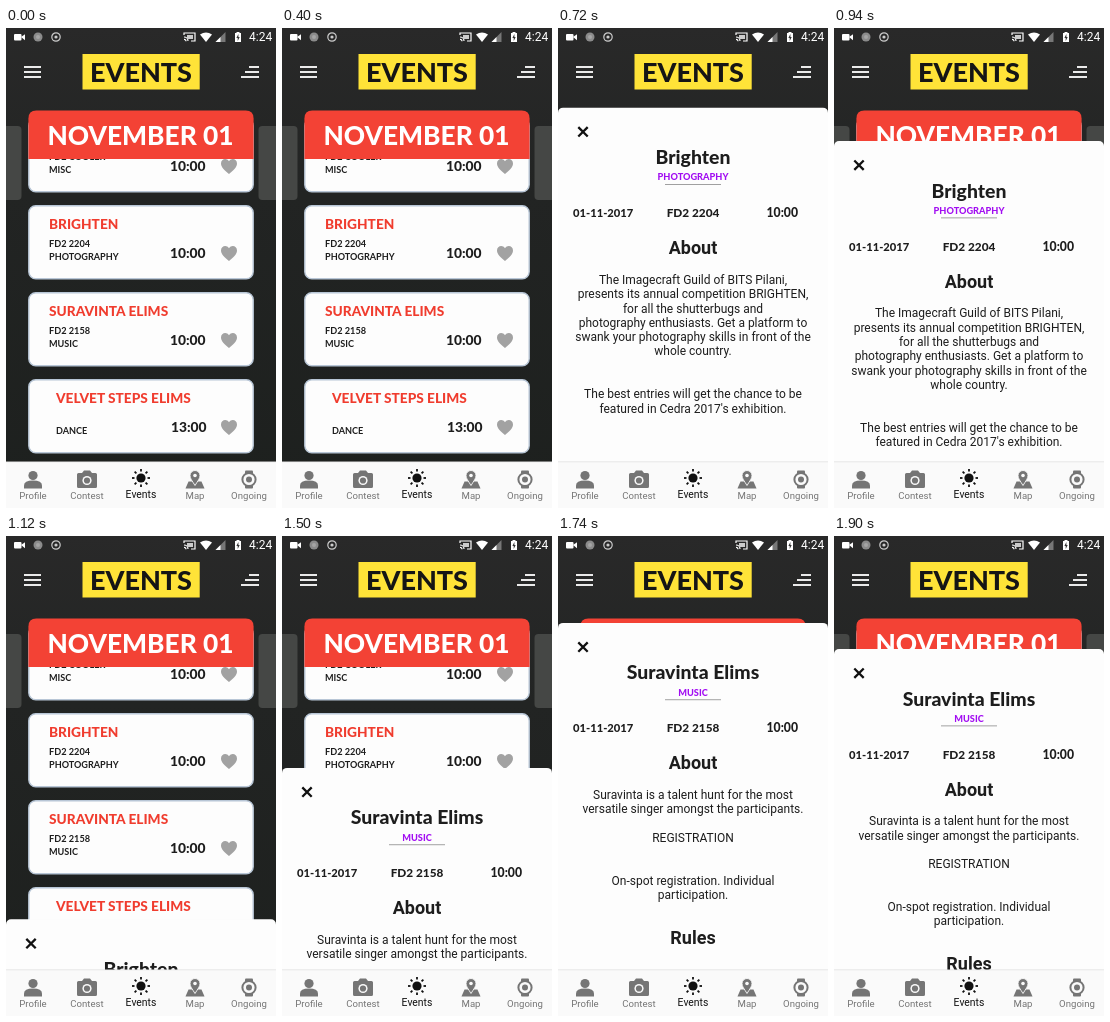
Write an HTML page that moves like this. It is 270 px wide and 480 px high and loops after 1.92 s.

```html
<!DOCTYPE html>
<html lang="en">
<head>
<meta charset="utf-8">
<title>Events</title>
<style>
html, body { margin: 0; width: 100%; height: 100%; overflow: hidden; background: #222; }
svg { display: block; width: 270px; height: 480px; }
text { font-family: Lato, "Open Sans", sans-serif; font-weight: 800; white-space: pre; }
.mid { text-anchor: middle; }
.body { font-family: Roboto, sans-serif; font-weight: 400; }
.head { font-family: Roboto, sans-serif; font-weight: 700; }
.small { font-weight: 700; }
</style>
</head>
<body>
<svg id="stage" viewBox="0 0 270 480"></svg>
<script>
const LOOP = 1920, REST = 113, HIDDEN = 480;

const text = (x, y, size, str, cls = '', fill = '#1d1d1d') =>
  `<text x="${x}" y="${y}" class="${cls}" style="font-size:${size}px;fill:${fill}">${str}</text>`;
const rect = (x, y, w, h, fill, r = 0, extra = '') =>
  `<rect x="${x}" y="${y}" width="${w}" height="${h}" rx="${r}" fill="${fill}" ${extra}/>`;
const path = (d, fill, extra = '') => `<path d="${d}" fill="${fill}" ${extra}/>`;
const circle = (x, y, r, fill, extra = '') =>
  `<circle cx="${x}" cy="${y}" r="${r}" fill="${fill}" ${extra}/>`;
const at = (x, y, inner, id = '') => `<g id="${id}" transform="translate(${x} ${y})">${inner}</g>`;

function statusBar() {
  return rect(8, 6, 7.5, 6.5, '#fff', 1) + path('M15 9l4-2.7v6z', '#fff') +
    circle(32, 9, 4.5, '#8b8b8b') + circle(32, 9, 2, '#a5a5a5') +
    circle(50, 9, 4.2, 'none', 'stroke="#ccc" stroke-width="1.2"') + circle(50, 9, 1.6, '#ccc') +
    path('M178 7V5h11v8h-4M178 9a4 4 0 0 1 4 4M178 11.3a2 2 0 0 1 2 2', 'none', 'stroke="#fff" stroke-width="1.2"') +
    rect(181, 7, 6, 4, '#ccc') +
    path('M194 6.5q6-4 12 0l-6 7.5z', '#fff') +
    path('M219.5 4v10h-10z', '#777') + path('M214.5 9v5h-5z', '#fff') +
    path('M229 5h1.5V4h3v1h1.5v9h-6z', '#fff') + path('M232.4 6l-2 4h1.3v3l2-4h-1.3z', '#333') +
    text(243, 13.2, 12, '4:24', 'body', '#fff');
}

function header() {
  const bars = [39, 44, 49];
  return bars.map(y => rect(18, y - .9, 17, 1.8, '#fff')).join('') +
    bars.map((y, i) => rect(243 - 4 * i, y - .9, 10 + 4 * i, 1.8, '#fff')).join('') +
    rect(76.5, 26, 117.2, 35.5, '#ffe338') +
    text(135, 54, 27, 'EVENTS', 'mid', '#151515');
}

function card(y, title, room, kind, time, x = 43) {
  const last = x > 43;
  return at(0, y,
    rect(22.8, .8, 224.4, 73, '#fdfdfd', 7, 'stroke="#b8c6d6" stroke-width="1.4"') +
    text(x, 24, 13.7, title, '', '#f03c2e') +
    text(43, 42.3, 9.2, room, 'small') +
    text(x, 55.4, 9.1, kind, 'small') +
    text(last ? 165 : 164, 53, 13.8, time) +
    path('M223 56c-4-3.6-8-6.6-8-10.6 0-4.6 5.6-6 8-2.2 2.4-3.8 8-2.4 8 2.2 0 4-4 7-8 10.6z', '#a2a2a2'));
}

function list() {
  return rect(-6, 98, 21.5, 74, '#454745', 4) + rect(252.5, 98, 24, 74, '#454745', 4) +
    card(90, '', 'FD2 COOLER', 'MISC', '10:00') +
    card(177, 'BRIGHTEN', 'FD2 2204', 'PHOTOGRAPHY', '10:00') +
    card(264, 'SURAVINTA ELIMS', 'FD2 2158', 'MUSIC', '10:00') +
    card(351, 'VELVET STEPS ELIMS', '', 'DANCE', '13:00', 50) +
    path('M22.4 131V90.5q0-8 8-8H239.6q8 0 8 8v40.5z', '#f34235') +
    text(134.5, 117, 26.3, 'NOVEMBER 01', 'mid', '#fff');
}

// Body lines are [row, text]; headings are [row, text, true].
function sheet(id, title, kind, room, lines) {
  return at(0, HIDDEN,
    rect(0, 0, 270, 500, '#fdfdfd', 5) +
    path('M20.3 19.5l9.4 9.4m0-9.4l-9.4 9.4', 'none', 'stroke="#111" stroke-width="2.3"') +
    text(135, 56.5, 19.4, title, 'mid') +
    text(135, 72.8, 9.2, kind, 'mid', '#a20df2') +
    rect(107, 76.5, 56, .8, '#8a8a8a') +
    text(15, 109.5, 11.2, '01-11-2017') +
    text(135, 109.5, 11.8, room, 'mid') +
    text(208.5, 109.5, 12.2, '10:00') +
    [[-2.2, 'About', true], ...lines].map(([row, str, big]) =>
      text(135, 172 + row * 14.3 + (big ? 6 : 4.3), big ? 18 : 12, str, 'mid ' + (big ? 'head' : 'body'))
    ).join(''), id);
}

function tabBar() {
  const grey = '#757575', paper = '#fafafa';
  const person = circle(0, -4, 4.6, grey) + path('M-9 9V6q0-5 9-5t9 5v3z', grey);
  const camera = path('M-10-5q0-1.5 1.5-1.5H-5L-3-9H3l2 2.5h3.5q1.5 0 1.5 1.5V7q0 1.5-1.5 1.5h-17Q-10 8.5-10 7z', grey) +
    circle(0, 1, 4.6, paper) + circle(0, 1, 3.1, grey);
  const sun = circle(0, 0, 4.6, '#111') + Array.from({ length: 8 }, (_, i) =>
    `<path d="M0-6.5V-9" stroke="#111" stroke-width="1.8" transform="rotate(${i * 45})"/>`).join('');
  const map = path('M-6.5 2H6.5L9.5 9H-9.5z', grey) +
    path('M0 6C-3 1-5-1-5-4a5 5 0 0 1 10 0c0 3-2 5-5 10z', grey, `stroke="${paper}" stroke-width=".9"`) +
    circle(0, -4, 1.8, paper);
  const watch = rect(-4, -9, 8, 18, grey, 1) +
    circle(0, 0, 6.6, paper, `stroke="${grey}" stroke-width="2"`) + circle(0, 0, 3, grey);
  const tabs = [['Profile', person], ['Contest', camera], ['Events', sun], ['Map', map], ['Ongoing', watch]];
  return rect(0, 434, 270, 46, paper) + rect(0, 433.5, 270, .7, '#ddd') +
    tabs.map(([name, icon], i) => {
      const x = 27 + 54 * i, on = i === 2;
      return at(x, on ? 450 : 451.5, icon) +
        text(x, on ? 470.2 : 470.6, on ? 10.4 : 9.6, name, 'mid body', on ? '#111' : grey);
    }).join('');
}

document.getElementById('stage').innerHTML =
  `<defs><linearGradient id="bg" x2="0" y2="1">
    <stop stop-color="#292929"/><stop offset=".35" stop-color="#222423"/><stop offset="1" stop-color="#1d201e"/>
  </linearGradient></defs>` +
  rect(0, 0, 270, 480, 'url(#bg)') + statusBar() + header() + list() +
  sheet('photo', 'Brighten', 'PHOTOGRAPHY', 'FD2 2204', [
    [0, 'The Imagecraft Guild of BITS Pilani,'],
    [1, 'presents its annual competition BRIGHTEN,'],
    [2, 'for all the shutterbugs and'],
    [3, 'photography enthusiasts. Get a platform to'],
    [4, 'swank your photography skills in front of the'],
    [5, 'whole country.'],
    [8, 'The best entries will get the chance to be'],
    [9, "featured in Cedra 2017's exhibition."]
  ]) +
  sheet('music', 'Suravinta Elims', 'MUSIC', 'FD2 2158', [
    [0, 'Suravinta is a talent hunt for the most'],
    [1, 'versatile singer amongst the participants.'],
    [3, 'REGISTRATION'],
    [6, 'On-spot registration. Individual'],
    [7, 'participation.'],
    [10, 'Rules', true]
  ]) + tabBar();

const clamp = u => Math.min(1, Math.max(0, u));
const outBack = u => 1 - 2.7 * (1 - u) ** 3 + 1.7 * (1 - u) ** 2;
const inOut = u => u < .5 ? 2 * u * u : 1 - 2 * (1 - u) ** 2;
const rise = (t, start) => outBack(clamp((t - start) / 444));
const fall = (t, start) => inOut(clamp((t - start) / 237));

function place(id, shown) {
  const y = HIDDEN + (REST - HIDDEN) * shown;
  document.getElementById(id).setAttribute('transform', `translate(0 ${y.toFixed(2)})`);
}

const begin = performance.now();
function draw() {
  const t = (performance.now() - begin) % LOOP;
  place('photo', rise(t, 429) - fall(t, 970));
  place('music', rise(t, 1417.4));
  requestAnimationFrame(draw);
}
draw();
</script>
</body>
</html>
```
